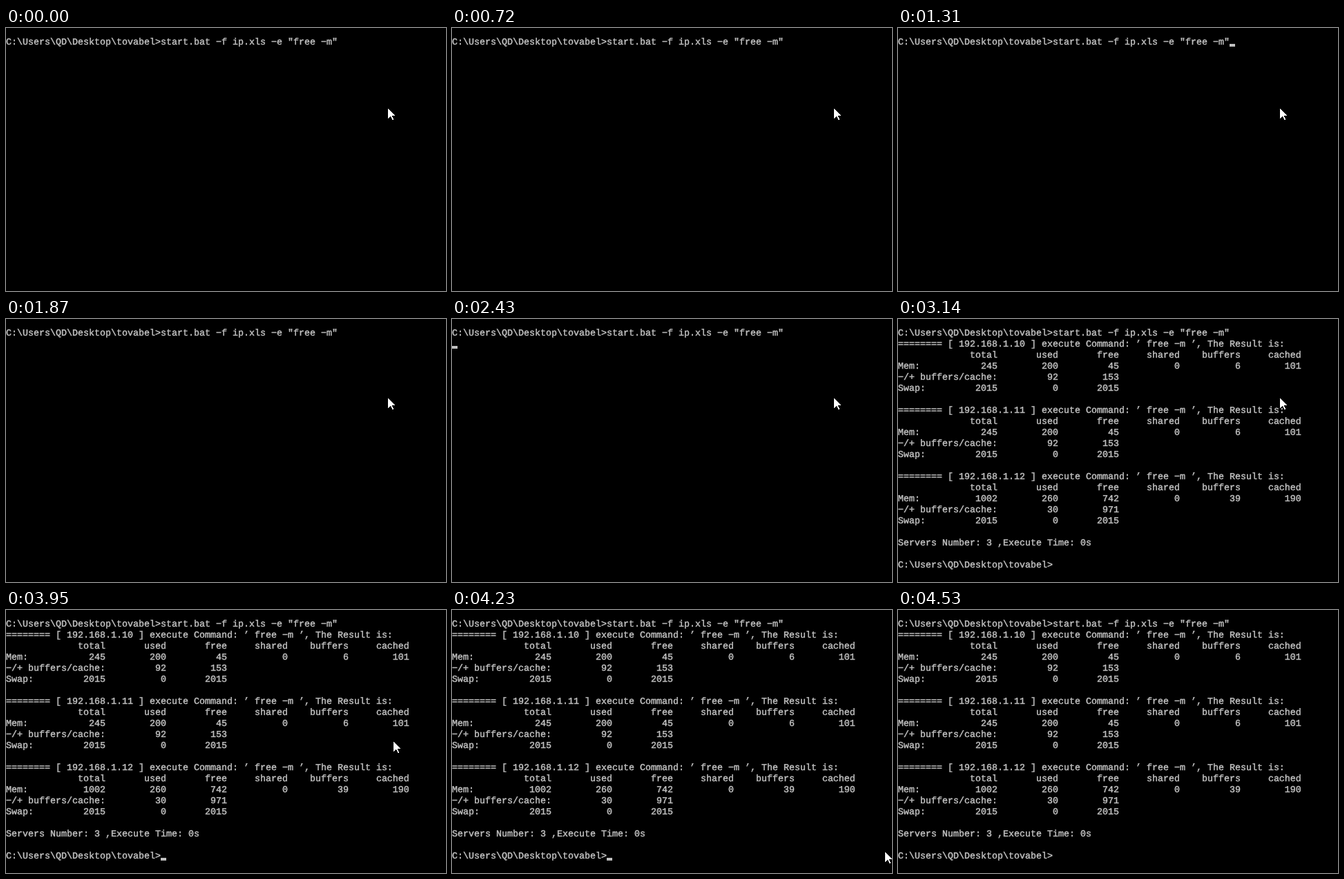
Write an HTML page that moves like this. It is 637x381 px and loops after 4.8 s.

```html
<!DOCTYPE html>
<html lang="en">
<head>
<meta charset="utf-8">
<title>Console session</title>
<style>
html, body {
  margin: 0;
  width: 100%;
  height: 100%;
  overflow: hidden;
  background: #000;
}
pre, .caret, .mouse {
  position: absolute;
  left: 0;
  top: 0;
  margin: 0;
}
/* 8 x 16 px character cells */
pre {
  top: 14px;
  color: #c0c0c0;
  font: 13.333px/16px "Liberation Mono", "DejaVu Sans Mono", monospace;
  font-variant-ligatures: none;
  text-rendering: geometricPrecision;
  -webkit-text-stroke: .45px #c0c0c0;
}
.output, .caret, .mouse {
  animation: 4800ms step-end infinite;
}
.output { animation-name: output; }
.caret {
  width: 8px;
  height: 4px;
  background: #c0c0c0;
  animation-name: caret;
}
.mouse {
  width: 12px;
  height: 18px;
  overflow: visible;
  fill: #fff;
  stroke: #000;
  stroke-width: 2;
  paint-order: stroke;
  shape-rendering: crispEdges;
  animation-name: mouse;
}
@keyframes output {
  0% { visibility: hidden; }
  65.416%, 100% { visibility: visible; }
}
@keyframes caret {
  0% { opacity: 0; transform: translate(480px, 23px); }
  5.833% { opacity: 1; transform: translate(480px, 23px); }
  15% { opacity: 0; transform: translate(480px, 23px); }
  27.291% { opacity: 1; transform: translate(480px, 23px); }
  38.958% { opacity: 0; transform: translate(480px, 23px); }
  50.625% { opacity: 1; transform: translate(0, 39px); }
  59.583% { opacity: 0; transform: translate(0, 39px); }
  82.291% { opacity: 1; transform: translate(224px, 359px); }
  94.375%, 100% { opacity: 0; transform: translate(224px, 359px); }
}
@keyframes mouse {
  0% { opacity: 1; transform: translate(553px, 117px); }
  30.416% { opacity: 1; transform: translate(553px, 115px); }
  82.291% { opacity: 1; transform: translate(561px, 191px); }
  85.416% { opacity: 1; transform: translate(596px, 275px); }
  88.125% { opacity: 1; transform: translate(627px, 351px); }
  91.25%, 100% { opacity: 0; transform: translate(627px, 351px); }
}
</style>
</head>
<body>
<pre>C:\Users\QD\Desktop\tovabel&gt;start.bat −f ip.xls −e "free −m"
<span class="output">======== [ 192.168.1.10 ] execute Command: ’ free −m ’, The Result is:
             total       used       free     shared    buffers     cached
Mem:           245        200         45          0          6        101
−/+ buffers/cache:         92        153
Swap:         2015          0       2015

======== [ 192.168.1.11 ] execute Command: ’ free −m ’, The Result is:
             total       used       free     shared    buffers     cached
Mem:           245        200         45          0          6        101
−/+ buffers/cache:         92        153
Swap:         2015          0       2015

======== [ 192.168.1.12 ] execute Command: ’ free −m ’, The Result is:
             total       used       free     shared    buffers     cached
Mem:          1002        260        742          0         39        190
−/+ buffers/cache:         30        971
Swap:         2015          0       2015

Servers Number: 3 ,Execute Time: 0s

C:\Users\QD\Desktop\tovabel&gt;</span></pre>
<div class="caret"></div>
<svg class="mouse"><path d="M0 0h1v1h1v1h1v1h1v1h1v1h1v1h1v1h1v1h1v1h1v1H6v2h1v2h1v2H6v-2H5v-2H4v-1H3v1H2v1H1v1H0z"/></svg>
</body>
</html>
```
